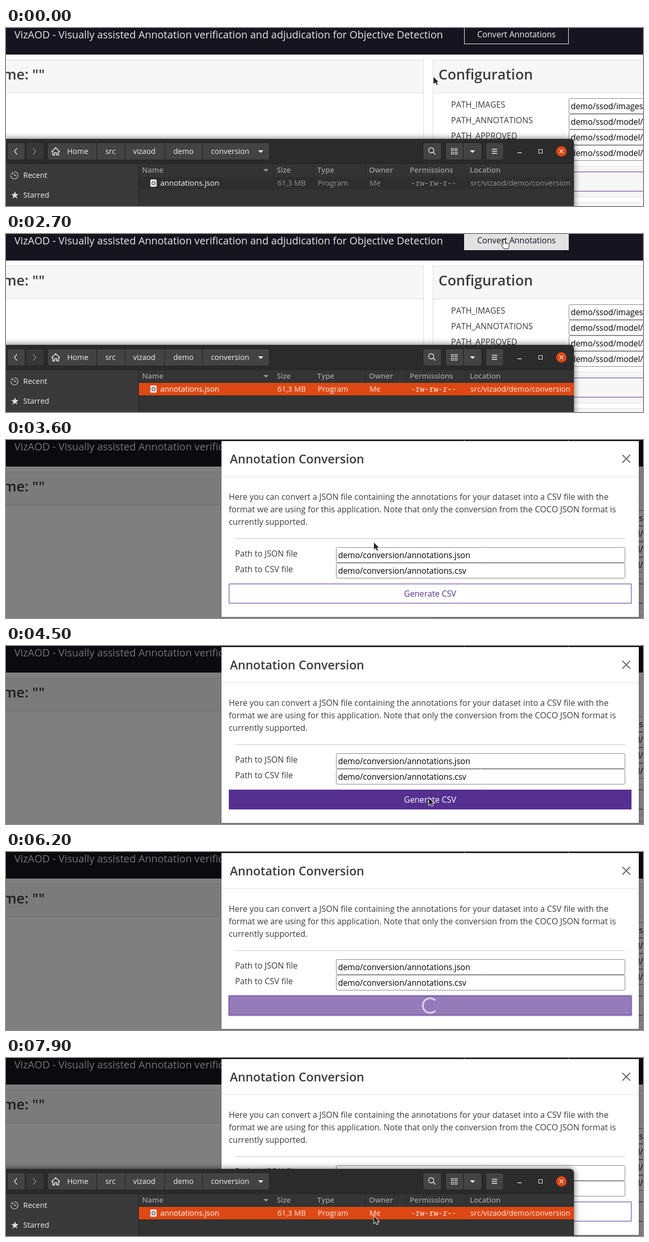
An HTML page with a canvas for the animation above (8 s loop, 1218x342 px).

```html
<!DOCTYPE html>
<html lang="en">
<head>
<meta charset="utf-8">
<title>Annotation conversion</title>
<style>
html, body { margin: 0; width: 1218px; height: 342px; overflow: hidden; }
canvas { display: block; }
</style>
</head>
<body>
<canvas id="stage" width="1218" height="342"></canvas>
<script>
const ctx = document.getElementById('stage').getContext('2d');
ctx.fontKerning = 'none';
const W = 1218, H = 342, LOOP = 8000;
const PURPLE = '#553090', ORANGE = '#dd4814', INK = '#3b3b3b';

// Pointer path: time, x, y, shape
const POINTER = [
  [0, 817, 93, 'arrow'], [400, 817, 93, 'arrow'], [500, 885, 62, 'arrow'],
  [600, 990, 25, 'arrow'], [700, 1053, 8, 'hand'], [800, 1053, 8, 'hand'],
  [900, 1020, 8, 'hand'], [1000, 1020, 8, 'hand'], [1100, 999, 17, 'arrow'],
  [1300, 925, 110, 'arrow'], [1500, 750, 265, 'arrow'], [1700, 703, 303, 'arrow'],
  [2100, 703, 303, 'arrow'], [2400, 880, 57, 'arrow'], [2500, 880, 57, 'arrow'],
  [2600, 925, 24, 'arrow'], [2700, 948, 10, 'hand'], [3000, 948, 10, 'arrow'],
  [3300, 905, 50, 'arrow'], [3400, 890, 58, 'arrow'], [3600, 703, 196, 'arrow'],
  [4000, 795, 301, 'hand'], [4200, 808, 291, 'hand'], [4500, 808, 291, 'arrow'],
  [4800, 0, 0, 'none'], [7500, 690, 342, 'arrow'], [7900, 703, 303, 'arrow'],
];

const clamp = v => Math.max(0, Math.min(1, v));
const inside = (p, x, y, w, h) => p.x >= x && p.x < x + w && p.y >= y && p.y < y + h;

function pointerAt(t) {
  let i = POINTER.length - 1;
  while (POINTER[i][0] > t) i--;
  const [t0, x0, y0, shape] = POINTER[i];
  const [t1, x1, y1] = POINTER[i + 1] || [LOOP, x0, y0];
  const k = (t - t0) / (t1 - t0);
  return { x: x0 + (x1 - x0) * k, y: y0 + (y1 - y0) * k, shape };
}

function rect(x, y, w, h, fill, stroke) {
  if (fill) { ctx.fillStyle = fill; ctx.fillRect(x, y, w, h); }
  if (stroke) {
    ctx.strokeStyle = stroke;
    ctx.lineWidth = 1;
    ctx.strokeRect(x + .5, y + .5, w - 1, h - 1);
  }
}

function round(x, y, w, h, radii, fill, stroke) {
  ctx.beginPath();
  ctx.roundRect(x, y, w, h, radii);
  ctx.fillStyle = fill;
  ctx.fill();
  if (stroke) { ctx.strokeStyle = stroke; ctx.lineWidth = 1; ctx.stroke(); }
}

function text(str, x, y, size, color = INK, { weight = 400, align = 'left', mono } = {}) {
  ctx.font = `${weight} ${size}px ${mono ? '"Noto Sans Mono", monospace' : '"Open Sans", sans-serif'}`;
  ctx.textAlign = align;
  ctx.fillStyle = color;
  ctx.fillText(str, x, y);
}

function path(d, x, y, { fill, stroke, width = 1 }) {
  const p = new Path2D(d);
  ctx.save();
  ctx.translate(x, y);
  ctx.lineWidth = width;
  if (stroke) { ctx.strokeStyle = stroke; ctx.stroke(p); }
  if (fill) { ctx.fillStyle = fill; ctx.fill(p); }
  ctx.restore();
}

function input(x, y, w, value) {
  round(x + .5, y + .5, w - 1, 29, 2, '#fff', '#85858c');
  text(value, x + 4, y + 21, 15.45, '#000');
}

function page(hover) {
  rect(0, 0, W, H, '#fff');
  rect(0, 0, W, 51, '#16141f');
  text('VizAOD - Visually assisted Annotation verification and adjudication for Objective Detection',
    16, 20, 19.64, '#e6e6e8');
  rect(876, -7, 200, 38, hover ? '#e2e2e3' : null, '#f0f0f0');
  text('Convert Annotations', 976, 18, 15.63, hover ? '#16141f' : '#f4f4f4', { align: 'center' });

  rect(-2, 61, 801, 300, '#fff', '#dcdcdc');
  rect(-2, 62, 800, 63, '#f7f7f7');
  rect(-2, 124, 800, 1, '#dcdcdc');
  text('Filename: ""', 74, 99, 27.2, INK, { weight: 600, align: 'right' });

  rect(816, 61, 410, 264, '#fff', '#dcdcdc');
  rect(817, 62, 405, 63, '#f7f7f7');
  rect(817, 124, 405, 1, '#dcdcdc');
  text('Configuration', 827, 99, 27.2, INK, { weight: 600 });
  ['IMAGES', 'ANNOTATIONS', 'APPROVED'].forEach((name, i) =>
    text('PATH_' + name, 851, 153 + 30 * i, 15.65));
  ['images', 'model/', 'model/', 'model/'].forEach((dir, i) =>
    input(1076, 135 + 30 * i, 160, 'demo/ssod/' + dir));
  rect(817, 265, 405, 59, '#f7f7f7');
  rect(817, 265, 405, 1, '#dcdcdc');
  rect(828, 276, 410, 38, null, PURPLE);
  rect(816, 335, 410, 20, '#f7f7f7', '#dcdcdc');
}

function spinner(t) {
  const turn = t < 5400 ? -.7 : t < 6200 ? -.25 : (t - 6200) / 750 * 2 * Math.PI;
  ctx.beginPath();
  ctx.arc(811, 295, 14, turn + Math.PI / 4, turn + Math.PI * 7 / 4);
  ctx.strokeStyle = '#d8cee5';
  ctx.lineWidth = 3.5;
  ctx.stroke();
}

function modal(t, hover) {
  const k = clamp((t - 2900) / 300);
  const fade = clamp((t - 2900) / 150);
  const busy = t >= 4800 && t < 7100;
  rect(0, 0, W, H, `rgba(0,0,0,${fade / 2})`);
  ctx.save();
  ctx.globalAlpha = fade;
  ctx.translate(0, -50 * (1 - k) ** 2);
  rect(411, 1, 800, 340, 'rgba(0,0,0,.2)');
  rect(412, 2, 798, 338, '#fff');
  rect(412, 70, 798, 1, '#e5e5e5');
  text('Annotation Conversion', 428, 45, 23.1, INK, { weight: 600 });
  path('M0 0L15 15M15 0L0 15', 1178.5, 28.5, { stroke: '#666', width: 1.9 });
  ['Here you can convert a JSON file containing the annotations for your dataset into a CSV file with the',
    'format we are using for this application. Note that only the conversion from the COCO JSON format is',
    'currently supported.'].forEach((line, i) => text(line, 426, 115 + 24 * i, 15.72));
  rect(438, 189, 746, 1, '#c8c8c8');
  ['json', 'csv'].forEach((ext, i) => {
    text(`Path to ${ext.toUpperCase()} file`, 438, 224 + 30 * i, 15.7);
    input(631, 206 + 30 * i, 553, 'demo/conversion/annotations.' + ext);
  });
  if (busy) rect(424, 274, 774, 42, '#d5cae4');
  rect(426, 276, 770, 38, busy ? '#957bb9' : hover ? PURPLE : '#fff', PURPLE);
  if (busy) spinner(t);
  else text('Generate CSV', 811, 301, 15.67, hover ? '#fff' : PURPLE, { align: 'center' });
  ctx.restore();
}

function toolbar() {
  const light = '#f2f2f2', button = '#434343', edge = '#202020';
  [[2, 34, '#434343'], [37, 35, '#373737'], [79, 424, button], [797, 35, button], [840, 69, button], [917, 34, button]]
    .forEach(([x, w, fill]) => round(x + .5, 220.5, w, 33, 4, fill, edge));
  [173, 227, 303, 375, 874].forEach(x => rect(x, 221, 1, 32, edge));
  path('M5 0L0 6L5 12', 16, 231, { stroke: light, width: 1.2 });
  path('M0 0L5 6L0 12', 52, 231, { stroke: '#8a8a8a', width: 1.2 });
  path('M0 8L8 0L16 8M2.5 7V14H6V9.5H10V14H13.500V7', 87, 230, { stroke: light, width: 1.5 });
  [['Home', 117], ['src', 190], ['vizaod', 243], ['demo', 320], ['conversion', 392]]
    .forEach(([name, x]) => text(name, x, 242, 14.3, light));
  [482, 887].forEach(x => path('M0 0H10L5 5Z', x, 235, { fill: light }));
  path('M10 5A5 5 0 1 1 0 5A5 5 0 1 1 10 5M8.500 8.500L13 13', 808, 230, { stroke: light, width: 1.3 });
  for (let i = 0; i < 4; i++)
    rect(851 + 7 * (i % 2), 231 + 7 * (i >> 1), 5, 5, null, light);
  for (let i = 0; i < 3; i++) rect(929, 232 + 4 * i, 10, 1.5, light);
  rect(978, 239, 8, 1.3, light);
  rect(1018, 233, 8, 8, null, light);
  ctx.beginPath();
  ctx.arc(1062, 237, 10, 0, 7);
  ctx.fillStyle = ORANGE;
  ctx.fill();
  path('M0 0L7 7M7 0L0 7', 1058.5, 233.5, { stroke: '#fff', width: 1.2 });
}

function fileManager(selected) {
  ctx.save();
  ctx.shadowColor = 'rgba(0,0,0,.6)';
  ctx.shadowBlur = 13;
  round(-10, 213, 1096, 150, [0, 8, 0, 0], '#2b2b2b');
  ctx.restore();
  toolbar();

  rect(0, 261, 253, 81, '#393939');
  rect(253, 261, 833, 81, '#333');
  rect(0, 260, 1086, 1, '#1f1f1f');
  rect(253, 261, 1, 81, '#222');
  path('M7 0A7 7 0 1 1 0 7M7 3V7.500H11M0 4H3.500V0', 9, 276, { stroke: '#ddd', width: 1.1 });
  path('M7 0L9 5H14L10 8.500L11.500 14L7 10.500L2.500 14L4 8.500L0 5H5Z', 10, 314, { fill: '#ddd' });
  text('Recent', 33, 288, 14.4, '#f2f2f2');
  text('Starred', 33, 326, 14.4, '#f2f2f2');

  rect(254, 261, 832, 24, '#343434');
  rect(254, 286, 832, 24, selected ? ORANGE : '#2e2e2e');
  [511, 588, 687, 765, 880].forEach(x => rect(x, 261, 1, 24, '#282828'));
  [['Name', 260], ['Size', 518], ['Type', 595], ['Owner', 694], ['Permissions', 772], ['Location', 887]]
    .forEach(([name, x]) => text(name, x, 278, 14.2, '#9a9a9a', { weight: 600 }));
  path('M0 0H10L5 5Z', 492, 271, { fill: '#9a9a9a' });
  round(276, 291, 12, 14, 2, '#f0f0f0');
  path('M6 3A3 3 0 1 1 0 3A3 3 0 1 1 6 3', 279, 295, { stroke: '#777', width: 2 });
  const dim = selected ? '#fbeae4' : '#929292';
  text('annotations.json', 295, 303, 14.45, '#fff');
  [['61,3 MB', 519], ['Program', 596], ['Me', 695], ['src/vizaod/demo/conversion', 888]]
    .forEach(([cell, x]) => text(cell, x, 303, 14.4, dim));
  text('-rw-rw-r--', 774, 303, 14.5, dim, { mono: true });
}

function pointer({ x, y, shape }) {
  if (shape === 'arrow')
    path('M.5 1V14.500L4 11.500L6.200 16.500L8.300 15.600L6.200 10.800H10Z', x, y,
      { fill: '#222', stroke: '#fff', width: 1.8 });
  if (shape === 'hand')
    path('M3 2Q5 0 6 2V8L12 9Q14 10 13.500 13L12 18H5L0 12Q0 9 3 11Z', x, y,
      { fill: '#fff', stroke: '#222', width: 2 });
}

function draw(now) {
  const t = Math.floor(now % LOOP / 100) * 100;
  const p = pointerAt(t);
  const open = t >= 2900;
  page(!open && inside(p, 876, 0, 200, 31));
  if (open) modal(t, inside(p, 426, 276, 770, 38) && t < 4800);
  if (t < 2800 || t >= 7300) fileManager(t >= 1600);
  pointer(p);
}

function tick() {
  draw(performance.now());
  requestAnimationFrame(tick);
}
tick();
</script>
</body>
</html>
```
